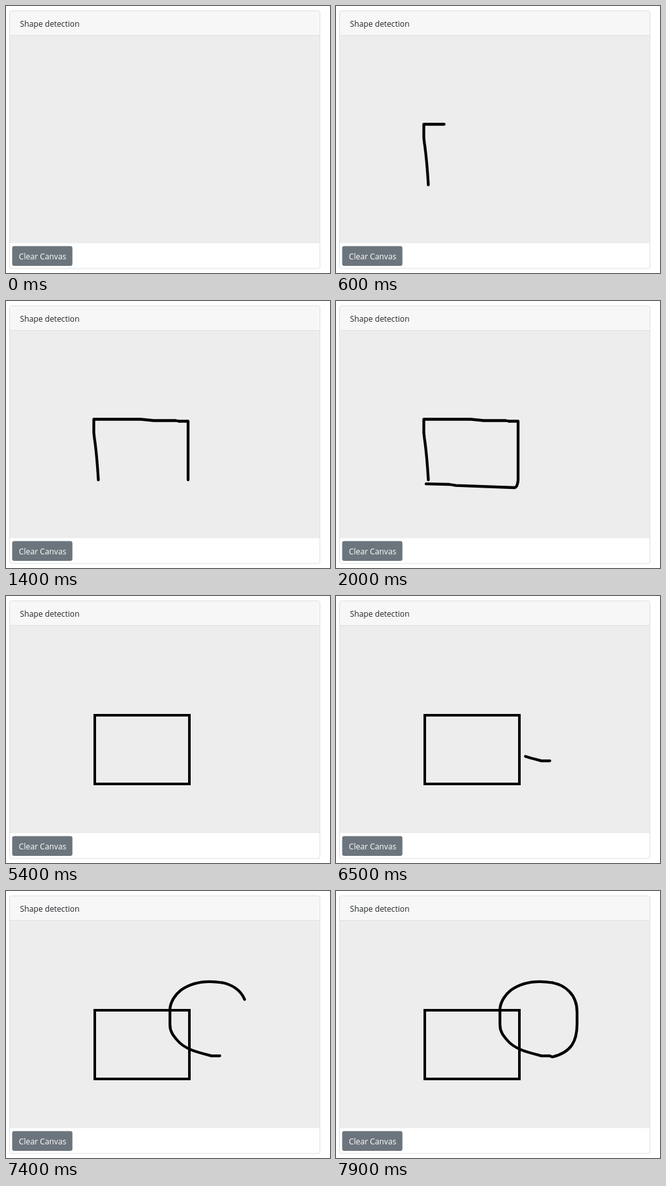
An HTML page that plays this animation: 500 by 412 pixels, repeating every 8 s.

```html
<!DOCTYPE html>
<html lang="en">
<head>
<meta charset="utf-8">
<title>Shape detection</title>
<style>
  html, body { margin: 0; width: 100%; height: 100%; overflow: hidden; background: #fff; }
  svg { display: block; width: 100%; height: 100%; }
  text { font: 12.2px "Open Sans", "Noto Sans", sans-serif; }
  .ink { fill: none; stroke: #000; stroke-width: 4.3; stroke-linecap: round; stroke-linejoin: round; }
</style>
</head>
<body>
<svg viewBox="0 0 500 412">
  <rect x="5.5" y="7.5" width="479" height="397.5" rx="3" fill="#fff"/>
  <path d="M5.5 46V10.5a3 3 0 0 1 3-3h473a3 3 0 0 1 3 3V46z" fill="#f7f7f7"/>
  <rect x="5" y="46" width="480" height="320" fill="#ededed"/>
  <path d="M5 45.5H485" stroke="#dfdfdf"/>
  <rect x="5.5" y="7.5" width="479" height="397.5" rx="3" fill="none" stroke="#dfdfdf"/>
  <text x="21.5" y="31.5" fill="#212529">Shape detection</text>
  <rect x="9.5" y="370.5" width="93" height="30.5" rx="3.2" fill="#6c757d"/>
  <text x="19.8" y="390.6" fill="#fff">Clear Canvas</text>

  <!-- each stroke is drawn between its two times, in ms -->
  <g id="sketch" class="ink">
    <path data-from="100" data-to="1000" d="M142.5 276Q140 235 136.5 212L135.5 203V182.5H208L228 184.5H262L267 185.5"/>
    <path data-from="1000" data-to="1400" d="M267 185.5H281V276"/>
    <path data-from="1400" data-to="1900" d="M281 276Q280 288 275 288L185 284.7L175 283L139 282.2"/>
  </g>
  <rect id="clean" x="137" y="184" width="146" height="106" fill="none" stroke="#000" stroke-width="4"/>
  <g class="ink">
    <path data-from="6300" data-to="6900" d="M330 254.3H317C296 249 276 244.5 264 230C258 223 253 217 253 206V190"/>
    <path data-from="6900" data-to="7200" d="M253 190V182C254 170 262 159 270 153C284 143 305 137 334 141.5"/>
    <path data-from="7200" data-to="7900" d="M334 141.5C352 145 372 158 372 187V205C372 232 363 249 334 256L331 255"/>
  </g>
</svg>
<script>
const LOOP = 8000, STEP = 100, SNAP = 5400;
const sketch = document.getElementById('sketch');
const clean = document.getElementById('clean');

const strokes = [...document.querySelectorAll('.ink path')].map(el => ({
  el,
  from: +el.dataset.from,
  to: +el.dataset.to,
  length: el.getTotalLength()
}));

const show = (el, on) => { el.style.display = on ? '' : 'none'; };

function drawStroke({ el, from, to, length }, t) {
  const part = Math.min(1, (t - from) / (to - from));
  show(el, part > 0);
  el.setAttribute('stroke-dasharray', part < 1 ? `${Math.max(0, part) * length} ${length + 10}` : 'none');
}

function render(time) {
  // The pen is sampled ten times a second.
  const t = Math.floor(time % LOOP / STEP) * STEP;
  strokes.forEach(stroke => drawStroke(stroke, t));
  show(sketch, t < SNAP);
  show(clean, t >= SNAP);
}

const start = performance.now();
function tick() {
  render(performance.now() - start);
  requestAnimationFrame(tick);
}
tick();
</script>
</body>
</html>
```
